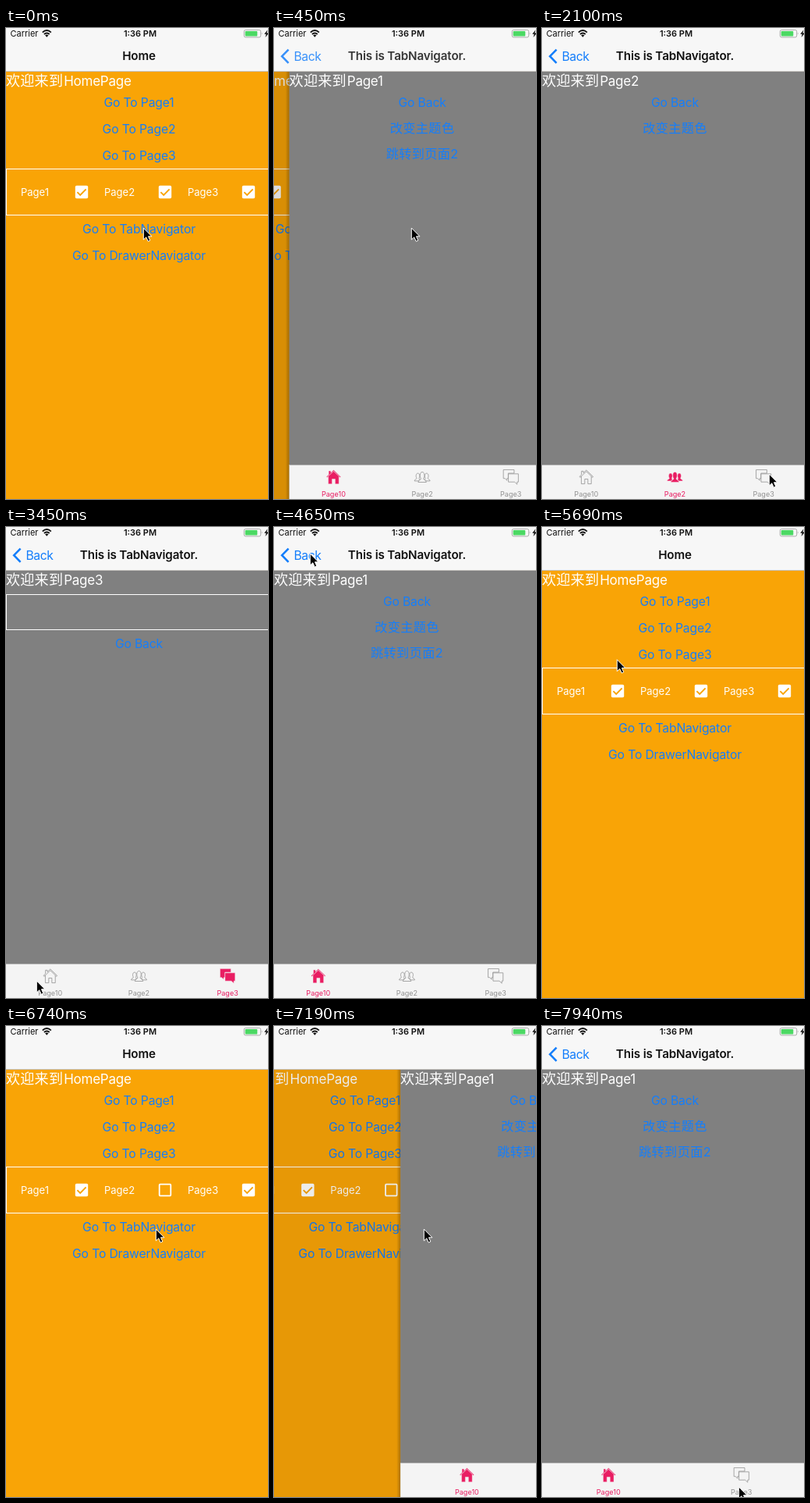
An HTML page for the animation above (8000 ms loop, 336 by 603 pixels).

```html
<!DOCTYPE html>
<html lang="zh">
<head>
<meta charset="utf-8">
<title>Tab navigator demo</title>
<style>
  html, body { margin: 0; width: 100%; height: 100%; overflow: hidden; background: #f7f7f7; }
  svg { display: block; width: 100%; height: 100%; }
  text { font: 15.7px Inter, "Noto Sans CJK SC", "Noto Sans CJK", sans-serif; letter-spacing: -.14px; }
  .mid { text-anchor: middle; }
  .link { fill: #147efb; }
  .back { letter-spacing: -.45px; }
  .cjk { font-size: 16.2px; letter-spacing: .35px; }
  .hello { font-size: 17px; letter-spacing: -.25px; fill: #fff; }
  .hello .cjk { font-size: 18.1px; font-weight: 300; letter-spacing: .2px; }
  .title { font-size: 15.2px; font-weight: 600; letter-spacing: -.14px; fill: #111; }
  .status { font-size: 11px; letter-spacing: 0; fill: #111; }
  .check { font-size: 13px; letter-spacing: 0; fill: #fff; }
  .tab { font-size: 9.1px; letter-spacing: 0; }
</style>
</head>
<body>
<svg id="stage" viewBox="0 0 336 603" preserveAspectRatio="none">
  <defs>
    <linearGradient id="edge">
      <stop offset="0" stop-color="#000" stop-opacity="0"/>
      <stop offset="1" stop-color="#000" stop-opacity=".25"/>
    </linearGradient>
    <clipPath id="body"><rect y="55" width="336" height="548"/></clipPath>
  </defs>
  <g id="scene"></g>
</svg>
<script>
const LOOP = 8000, STEP = 150, W = 341, MID = 170.5;
const ORANGE = '#f9a406', GRAY = '#808080', BAR = '#f7f7f7', TABS = '#f4f4f4';
const PINK = '#e91e63', DIM = '#929292', BLUE = '#147efb';
const scene = document.getElementById('scene');

// Pointer tip: time, x, y
const path = [
  [450, 176, 256], [600, 176, 262], [750, 178, 310], [900, 178, 425], [1050, 173, 527],
  [1200, 168, 566], [1350, 166, 578], [1650, 166, 578], [1950, 262, 574], [2100, 291, 571],
  [2550, 291, 571], [2700, 282, 556], [3000, 180, 498], [3300, 62, 563], [3450, 39, 581],
  [3750, 39, 581], [3900, 42, 550], [4200, 52, 250], [4500, 48, 52], [4650, 46, 34],
  [4950, 46, 34], [5100, 53, 58], [5400, 85, 155], [5990, 128, 213], [6290, 207, 211],
  [6440, 207, 211], [6740, 192, 260], [7340, 192, 260], [7490, 198, 320], [7640, 222, 450],
  [7790, 245, 562], [7940, 252, 590]
];

function pointerAt(t) {
  const i = path.findIndex(k => k[0] > t);
  if (i === 0) return path[0].slice(1);
  if (i < 0) return path[path.length - 1].slice(1);
  const [a, b] = [path[i - 1], path[i]], u = (t - a[0]) / (b[0] - a[0]);
  return [1, 2].map(n => a[n] + (b[n] - a[n]) * u);
}

// cubic-bezier(.2833, .99, .31833, .99)
function ease(u) {
  if (u <= 0) return 0;
  if (u >= 1) return 1;
  const curve = (s, a, b) => 3 * (1 - s) ** 2 * s * a + 3 * (1 - s) * s * s * b + s ** 3;
  let lo = 0, hi = 1;
  for (let i = 0; i < 20; i++) {
    const s = (lo + hi) / 2;
    if (curve(s, .2833, .31833) < u) lo = s; else hi = s;
  }
  return curve(lo, .99, .99);
}

const slide = (t, start) => ease((t - start) / 500);
const at = (x, y, inner, extra = '') => `<g transform="translate(${x} ${y})" ${extra}>${inner}</g>`;
const text = (x, y, cls, str, extra = '') => `<text x="${x}" y="${y}" class="${cls}" ${extra}>${str}</text>`;
const link = (y, str, extra) => text(MID, y, 'mid link', str, extra);
const cjkLink = (y, str) => text(MID, y, 'mid link cjk', str);
const hello = name => text(0, 74, 'hello', `<tspan class="cjk">欢迎来到</tspan><tspan dx="1">${name}</tspan>`);

function checkbox(x, label, on) {
  const box = on
    ? `<rect x="-8.2" y="-8.2" width="16.4" height="16.4" rx="1.8" fill="#fff"/>
       <path d="M-5.6 .2L-1.8 4L5.6-3.7" fill="none" stroke="${ORANGE}" stroke-width="1.9"/>`
    : `<rect x="-7.3" y="-7.3" width="14.6" height="14.6" rx="1" fill="none" stroke="#fff" stroke-width="1.8"/>`;
  return text(x, 214.5, 'check', label) + at(x + 78, 210, box);
}

function home(pressed, page2) {
  return `<rect y="55" width="${W}" height="548" fill="${ORANGE}"/>` + hello('HomePage') +
    [1, 2, 3].map(n => link(67 + 34 * n, 'Go To Page' + n)).join('') +
    `<rect x=".5" y="180.5" width="${W - 1}" height="59" fill="none" stroke="#fff"/>` +
    [true, page2, true].map((on, i) => checkbox(19 + 107 * i, 'Page' + (i + 1), on)).join('') +
    link(263, 'Go To TabNavigator', pressed ? 'opacity=".3"' : '') +
    link(297, 'Go To DrawerNavigator');
}

const icons = {
  Page10: on => on
    ? `<path d="M0-9.2L9.2-.6L8.2 .6L6.8-.6V8.8H2V2.5H-2V8.8H-6.8V-.6L-8.2 .6L-9.2-.6L-6.3-3.3V-8H-3.6V-5.8Z"/>
       <path d="M-8-.3L0-7.6L8-.3" fill="none" stroke="${TABS}" stroke-width=".7"/>`
    : `<path d="M-6.4-1V8.6H-2V2.5H2V8.6H6.4V-1"/>
       <path d="M0-9L8.8-.6L8 .4L0-7.2L-8 .4L-8.8-.6L-6.2-3.1V-7.6H-3.8V-5.4Z"/>`,
  Page2: () => {
    const bust = 'M-5.2 6.5C-5.2 3.6-1.6 4-1.6 1.8C-3.2 .2-3.6-6.5 0-6.5S3.2 .2 1.6 1.8C1.6 4 5.2 3.6 5.2 6.5Z';
    const side = 'M-4.4 4.6C-4.4 2.4-1.6 2.6-1.5 1C-2.8-.4-2.8-5.2 0-5.2S2.6-.4 1.5 1C1.6 2.2 2.4 2.4 2.4 2.4L.6 4.6Z';
    return `<path d="${side}" transform="translate(-5.6 .3)"/><path d="${side}" transform="translate(5.6 .3) scale(-1 1)"/><path d="${bust}"/>`;
  },
  Page3: () => `<path d="M-3.4 1.7H-5V4.2L-7.6 1.7H-9.6V-9.4H4.2V-5H-3.4Z"/>
    <path d="M-3.2-4.2H9.6V6.2H8V9.2L4.8 6.2H-3.2Z"/>`
};

function tabBar(tabs, active) {
  const size = W / tabs.length;
  return `<rect y="559" width="${W}" height="44" fill="${TABS}"/>
    <rect y="559" width="${W}" height="1" fill="#b8b8b8"/>` +
    tabs.map((name, i) => {
      const on = name === active, x = size * (i + .5);
      const paint = on
        ? `fill="${PINK}" stroke="${TABS}" stroke-width=".4"`
        : `fill="${TABS}" stroke="${DIM}" stroke-width=".8"`;
      return at(x, 575, icons[name](on), paint) +
        text(x, 600.3, 'mid tab', name, `fill="${on ? PINK : DIM}"`);
    }).join('');
}

const pages = {
  Page10: () => hello('Page1') + link(101, 'Go Back') + cjkLink(134, '改变主题色') + cjkLink(167, '跳转到页面2'),
  Page2: () => hello('Page2') + link(101, 'Go Back') + cjkLink(134, '改变主题色'),
  Page3: () => hello('Page3') +
    `<rect x=".5" y="86.5" width="${W - 1}" height="45" fill="none" stroke="#fff"/>` + link(155, 'Go Back')
};

function tabPage(tabs, active) {
  return `<rect x="-5" y="55" width="5" height="548" fill="url(#edge)"/>
    <rect y="55" width="${W}" height="548" fill="${GRAY}"/>` + pages[active]() + tabBar(tabs, active);
}

function header(p) {
  const fade = v => Math.max(0, (v - .65) / .35);
  return `<rect width="336" height="55" fill="${BAR}"/>
    <rect y="55" width="336" height="1" fill="#c4c2be"/>` +
    text(MID, 41, 'mid title', 'Home', `opacity="${fade(1 - p)}"`) +
    `<g opacity="${fade(p)}">
      <path d="M18.6 27.6L10.2 36.2L18.6 44.8" fill="none" stroke="${BLUE}" stroke-width="2.6"/>` +
      text(25.5, 41.7, 'link back', 'Back') + text(MID, 41, 'mid title', 'This is TabNavigator.') +
    `</g>`;
}

function statusBar() {
  return text(5.5, 11, 'status', 'Carrier') + text(172, 11, 'status mid', '1:36 PM', 'style="font-weight:600"') +
    `<g fill="none" stroke="#111" stroke-width="1.9">
      <path d="M46.8 5.6Q52.3 .6 57.8 5.6M48.9 8Q52.3 4.9 55.7 8"/></g>
    <path d="M50.1 9.3Q52.3 7.5 54.5 9.3L52.3 11.8Z" fill="#111"/>
    <rect x="305.3" y="2.5" width="21.4" height="9.4" rx="2" fill="none" stroke="#999" stroke-width=".8"/>
    <rect x="306.7" y="3.9" width="15.6" height="6.6" rx=".9" fill="#4cd964"/>
    <path d="M327.8 5.6Q329.3 7.2 327.8 8.8Z" fill="#999"/>
    <path d="M335.4 2.4L331.2 7.8H333.6L332.6 12L337 6.4H334.4Z" fill="#111"/>`;
}

const pointer = ([x, y]) => at(x, y,
  '<path d="M.3 0V15L3.8 11.8L6.2 17.2L8.8 16L6.5 10.8H11Z" fill="#000" stroke="#fff" stroke-width="1" stroke-linejoin="round"/>');

function draw(t) {
  const p = slide(t, 218) - slide(t, 4902) + slide(t, 7109);
  const tabs = t < 6440 ? ['Page10', 'Page2', 'Page3'] : ['Page10', 'Page3'];
  const active = t >= 1650 && t < 2400 ? 'Page2' : t >= 2400 && t < 3750 ? 'Page3' : 'Page10';
  const pressed = (t >= 150 && t < 300) || (t >= 7040 && t < 7190);
  const under = p < 1
    ? at(-.3 * W * p, 0, home(pressed, t < 6440)) +
      `<rect y="55" width="336" height="548" opacity="${.14 * p}"/>`
    : '';
  const over = p > 0 ? at(W * (1 - p), 0, tabPage(tabs, active)) : '';
  scene.innerHTML = `<g clip-path="url(#body)">${under}${over}</g>` + header(p) + statusBar() + pointer(pointerAt(t));
}

// Time advances in 150 ms steps, with one 140 ms step before SHIFT
const SHIFT = 5990;
const hold = t => t < SHIFT ? Math.floor(t / STEP) * STEP : SHIFT + Math.floor((t - SHIFT) / STEP) * STEP;

let last = -1;
function tick() {
  const t = hold(performance.now() % LOOP);
  if (t !== last) draw(last = t);
  requestAnimationFrame(tick);
}
tick();
</script>
</body>
</html>
```
